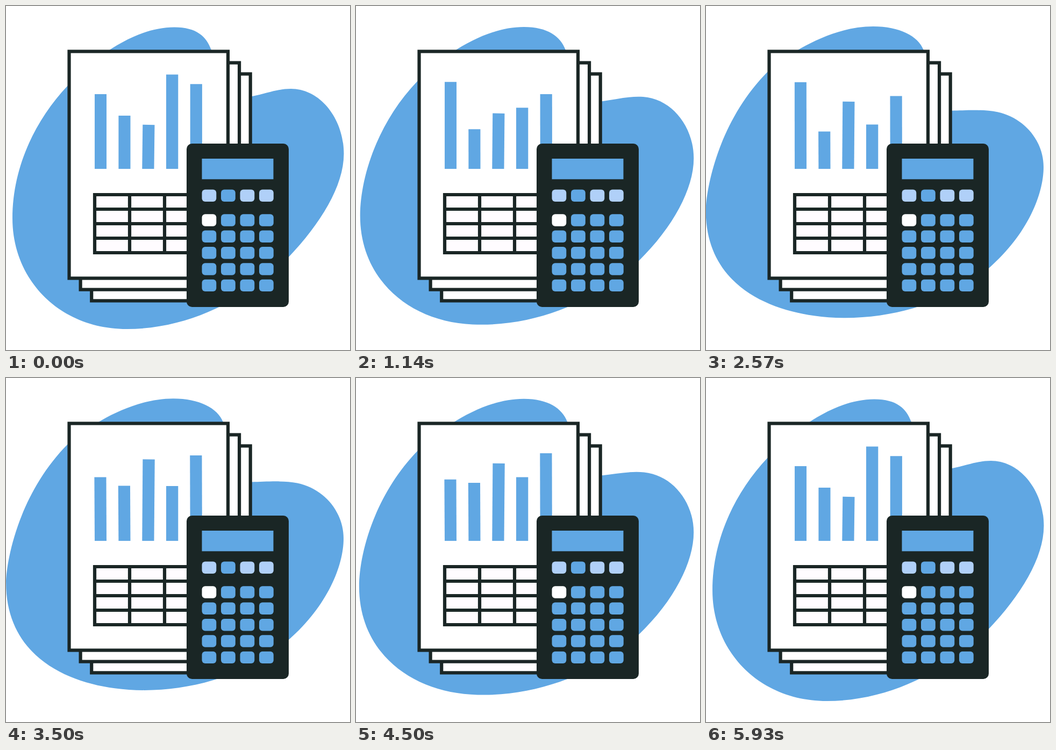
These frames come from a looping animation (640 px wide and 640 px high, 6000 ms). An HTML page:

```html
<!DOCTYPE html>
<html lang="en">
<head>
<meta charset="utf-8">
<title>Report and calculator</title>
<style>
  html, body { margin: 0; width: 100%; height: 100%; overflow: hidden; background: #fff; }
  svg { display: block; width: 100%; height: 100%; }
  .blue { fill: #60a7e3; }
  .light { fill: #b0d0f8; }
  .white { fill: #fff; }
  .ink { fill: #1a2625; }
  .line { stroke: #1a2625; stroke-width: 6.2; }

  .morph {
    animation-duration: 6s;
    animation-timing-function: cubic-bezier(.333, 0, .667, 1);
    animation-iteration-count: infinite;
  }
  #blob { animation-name: blob; }
  #bar1 { animation-name: bar1; }
  #bar2 { animation-name: bar2; }
  #bar3 { animation-name: bar3; }
  #bar4 { animation-name: bar4; }
  #bar5 { animation-name: bar5; }

  @keyframes blob {
    0%, 98.83%, 100% { d: path("M313 39.5 C355 39.5 373 57 382 82 C400 130 420 175 458 168 C484 163 506 154 530 154 C585 154 628.5 210 628.5 275 C628.5 335 585 405 526 467 C455 540 345 601 225 601 C100 601 12 510 12 395 C12 305 50 217 115 148 C165 95 240 39.5 313 39.5 Z"); }
    49.4% { d: path("M311 38 C360 38 396 56 406 82 C420 130 425 196 458 196 C480 196 517 193.5 543 199.5 C593 211 628 253 628 301 C628 350 600 425 526 489 C443 562 310 591.5 200 575 C105 561 -1 512 -1 380 C-1 350 18 218 115 120.6 C158 84 235 38 311 38 Z"); }
  }
  @keyframes bar1 {
    0%, 98.83%, 100% { d: path("M165 303 L165 164 L187 164 L187 303 Z"); }
    32.75% { d: path("M165 303 L165 127.3 L187 127.3 L187 303 Z"); }
    66.3% { d: path("M165 303 L164.3 194 L186.4 194 L187 303 Z"); }
  }
  @keyframes bar2 {
    0%, 98.83%, 100% { d: path("M209.4 303 L209.4 204 L231.5 204 L231.5 303 Z"); }
    32.75% { d: path("M209.4 303 L209.2 244.7 L231.4 244.7 L231.5 303 Z"); }
    66.3% { d: path("M209.4 303 L208.7 193.1 L230.9 193.1 L231.5 303 Z"); }
  }
  @keyframes bar3 {
    0%, 98.83%, 100% { d: path("M253.3 303 L254.3 220.7 L276.5 221.2 L275.5 303 Z"); }
    32.75% { d: path("M253.3 303 L254.2 186.7 L276.4 187 L275.5 303 Z"); }
    66.3% { d: path("M253.3 303 L254.4 145.3 L276.8 145.5 L275.5 303 Z"); }
  }
  @keyframes bar4 {
    0%, 98.83%, 100% { d: path("M298 303 L298 127.5 L320.3 127.5 L320.3 303 Z"); }
    32.75% { d: path("M298 303 L298 227 L320.3 227 L320.3 303 Z"); }
    66.3% { d: path("M298 303 L298 196.7 L320.3 196.7 L320.3 303 Z"); }
  }
  @keyframes bar5 {
    0%, 98.83%, 100% { d: path("M342.7 303 L342.7 145.3 L364.9 145.3 L364.9 303 Z"); }
    32.75% { d: path("M342.7 303 L342.6 175.6 L364.8 175.6 L364.9 303 Z"); }
    66.3% { d: path("M342.7 303 L342.2 138.8 L364.4 138.8 L364.9 303 Z"); }
  }
</style>
</head>
<body>
<svg viewBox="0 0 640 640">
  <path id="blob" class="morph blue"/>

  <g class="white line">
    <rect x="159.2" y="126.4" width="295.5" height="422"/>
    <rect x="138.6" y="105.6" width="295.5" height="422"/>
    <rect x="117.5" y="84.5" width="295.5" height="422"/>
  </g>

  <g class="blue">
    <path id="bar1" class="morph"/>
    <path id="bar2" class="morph"/>
    <path id="bar3" class="morph"/>
    <path id="bar4" class="morph"/>
    <path id="bar5" class="morph"/>
  </g>

  <path class="line" fill="#fffcff" d="M165 351H360V459H165ZM165 378H360M165 405H360M165 432H360M230 351V459M295 351V459"/>

  <rect class="ink" x="336" y="256" width="190" height="304" rx="10"/>
  <rect class="blue" x="364.5" y="284" width="133" height="38.3"/>
  <g id="keys"></g>
</svg>
<script>
  const keys = document.getElementById('keys');
  const rows = [341.5, 387.3, 417.6, 448, 478.3, 508.7];
  const special = [['light', 'blue', 'light', 'light'], ['white']];

  rows.forEach((y, row) => {
    for (let col = 0; col < 4; col++) {
      const key = document.createElementNS('http://www.w3.org/2000/svg', 'rect');
      const attrs = { x: 364.5 + col * 35.5, y, width: 26.8, height: 22.4, rx: 6 };
      for (const name in attrs) key.setAttribute(name, attrs[name]);
      key.setAttribute('class', special[row]?.[col] ?? 'blue');
      keys.append(key);
    }
  });
</script>
</body>
</html>
```
